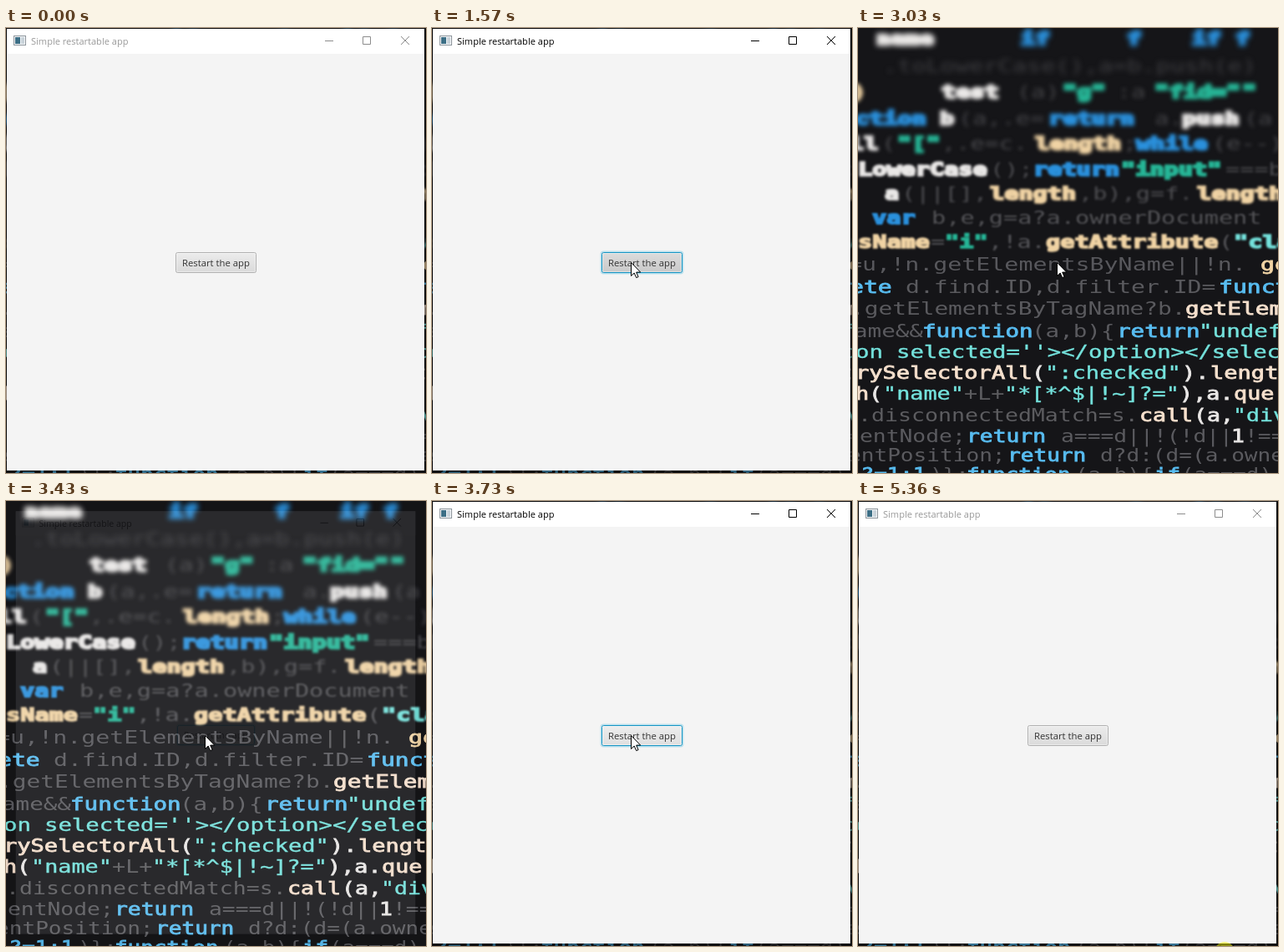
These frames come from a looping animation (503x534 px, 5820 ms). An HTML page:

```html
<!DOCTYPE html>
<html lang="en">
<head>
<meta charset="utf-8">
<title>Simple restartable app</title>
<style>
html, body { margin: 0; width: 100%; height: 100%; overflow: hidden; background: #151518; }
svg { display: block; width: 100%; height: 100%; }
text { white-space: pre; }
.ui { font-family: "Open Sans", "Noto Sans", sans-serif; }
#code { font: 21px "DejaVu Sans Mono", monospace; }
</style>
</head>
<body>
<svg viewBox="0 0 503 534">
  <defs>
    <linearGradient id="face" x1="0" y1="0" x2="0" y2="1">
      <stop id="faceTop"/><stop id="faceEnd" offset="1"/>
    </linearGradient>
  </defs>
  <rect width="503" height="534" fill="#151518"/>
  <g id="code"></g>
  <g id="win">
    <rect id="shadow" x="-9" y="-9" width="520" height="550" fill="none" stroke="#000" stroke-width="20"/>
    <rect x="1" y="1" width="500" height="530" fill="#f4f4f4"/>
    <rect x="1" y="1" width="500" height="30" fill="#fff"/>
    <g id="icon">
      <rect x="9.5" y="9.5" width="14" height="11" fill="#f4f6f8" stroke="#8d959c"/>
      <rect x="11" y="11" width="6" height="8" fill="#3d6f86"/>
      <rect x="18" y="11" width="4" height="8" fill="#c9d3da"/>
    </g>
    <text id="title" class="ui" x="30" y="20" font-size="11.05">Simple restartable app</text>
    <path id="controls" fill="none" d="M382 15.5h10M427.5 10.5h9v9h-9zM473 10l10 10M483 10l-10 10"/>
    <rect id="glow" x="202.3" y="268.3" width="98.4" height="26.4" rx="3" fill="none" stroke="#039ed3" stroke-opacity=".25" stroke-width="1.4"/>
    <rect id="button" x="203.5" y="269.5" width="96" height="24" rx="2" fill="url(#face)"/>
    <rect id="shine" x="204.5" y="270.5" width="94" height="22" rx="1" fill="none" stroke="#fff" stroke-opacity=".4"/>
    <text class="ui" x="211" y="286" font-size="11.3" fill="#333">Restart the app</text>
  </g>
  <circle id="click" r="12" fill="#ff0" fill-opacity=".47"/>
  <path id="cursor" d="M.5.5v16l3.7-3.5 2.5 5.6 2.4-1-2.4-5.5h5z" fill="#fff" stroke="#000"/>
</svg>
<script>
const $ = id => document.getElementById(id);
const set = (id, attrs) => { for (const k in attrs) $(id).setAttribute(k, attrs[k]); };
const show = (id, on) => set(id, { visibility: on ? 'visible' : 'hidden' });

const INK = { w: '#e9e7e6', t: '#f0d3a4', b: '#2a90dc', l: '#58bcf0', g: '#26b596', c: '#74e2dc', p: '#f6e0cd', d: '#5f5f63' };

// One line of the wallpaper: baseline, blur, then [x, ink, text] pieces.
// Letters get narrower down the page; blurred bright ones swell.
function line(y, blur, ...parts) {
  const advance = Math.min(17.2, 18.73 - .0058 * y);
  const spans = parts.map(([x, ink, s]) => {
    const dim = ink === 'd';
    const weight = dim ? 0 : blur > .6 ? 1 + blur * .7 : ink === 'c' ? .4 : .8;
    const safe = s.replace(/&/g, '&amp;').replace(/</g, '&lt;');
    return `<text transform="translate(${x} ${y}) scale(${advance / 12.64} 1)" fill="${INK[ink]}"` +
      ` stroke="${INK[ink]}" stroke-width="${weight}" opacity="${dim ? 1 - blur * .15 : 1}"` +
      ` font-weight="${blur > .6 && !dim ? 700 : 400}">${safe}</text>`;
  });
  $('code').insertAdjacentHTML('beforeend', `<g style="filter:blur(${blur}px)">${spans.join('')}</g>`);
}

line(20, 3.2, [22, 'w', 'name'], [195, 'b', 'if'], [322, 'b', 'f'], [400, 'b', 'if'], [452, 'b', 'f']);
line(53, 3, [30, 'd', '.toLowerCase(),a=b.push(e)']);
line(84, 2.6, [-8, 't', ')'], [100, 'w', 'test'], [190, 'd', '(a)'], [245, 'g', '"g"'], [310, 'd', ':a'], [355, 'g', '"fid="'], [460, 'g', '"']);
line(116, 2.4, [-4, 'b', 'ction'], [98, 'w', 'b'], [120, 'd', '(a,.e='], [228, 'b', 'return'], [338, 'd', ' a.'], [388, 'w', 'push'], [462, 'd', '(a']);
line(146, 2.1, [-10, 'w', 'll'], [28, 'd', '('], [47, 'g', '"["'], [100, 'd', ',.e=c.'], [212, 't', 'length'], [317, 'd', ';'], [333, 'b', 'while'], [424, 'd', '(e--)']);
line(177, 1.8, [0, 'w', 'LowerCase'], [158, 'd', '();'], [210, 'b', 'return'], [315, 'g', '"input"'], [440, 'd', '===b']);
line(206, 1.5, [32, 'w', 'a'], [52, 'd', '(||[],'], [158, 't', 'length'], [264, 'd', ',b),g=f.'], [406, 't', 'length']);
line(235, 1.1, [17, 'b', 'var'], [88, 'd', 'b,e,g=a?a.ownerDocument']);
line(264, .8, [0, 't', 'sName'], [87, 'd', '='], [104, 'g', '"i"'], [156, 'd', ',!a.'], [225, 't', 'getAttribute'], [432, 'd', '('], [450, 'c', '"cla']);
line(291, .6, [-12, 'd', '=u,!n.getElementsByName||!n.'], [482, 't', 'ge']);
line(318, .4, [-10, 'l', 'ete'], [57, 'd', 'd.find.ID,d.filter.ID='], [432, 'l', 'funct']);
line(344, .4, [-9, 'd', '.getElementsByTagName?b.'], [392, 'p', 'getElem']);
line(371, .3, [-5, 'd', 'ame&&'], [77, 'l', 'function'], [208, 'd', '(a,b){'], [310, 'l', 'return'], [408, 'c', '"undef']);
line(396, .2, [-3, 'c', 'on'], [46, 'c', "selected=''></option></selec"]);
line(421, .2, [-3, 'p', 'rySelectorAll'], [208, 'w', '('], [224, 'c', '":checked"'], [388, 'w', ').'], [422, 'p', 'lengt']);
line(446, .2, [-3, 'p', 'h'], [13, 'w', '('], [30, 'c', '"name"'], [127, 'd', '+L+'], [175, 'c', '"*[*^$|!~]?="'], [385, 'w', '),a.'], [450, 'p', 'que']);
line(472, .2, [0, 'd', '.disconnectedMatch=s.'], [337, 'p', 'call'], [402, 'w', '(a,'], [449, 'c', '"div']);
line(497, .3, [2, 'd', 'entNode;'], [130, 'l', 'return'], [243, 'd', 'a===d||!(!d||'], [447, 'w', '1'], [463, 'd', '!==']);
line(520, .3, [-12, 'd', 'entPosition;'], [179, 'l', 'return'], [290, 'd', 'd?d:(d=(a.owner']);
line(543, .4, [-12, 'l', '}?=1:1'], [86, 'd', ')}:'], [130, 'l', 'function'], [260, 'd', '(a,b){'], [355, 'l', 'if'], [387, 'd', '(a===d)']);

const LOOP = 5820;
const ON_BUTTON = [238, 281], ENTRY = [425, 520], EXIT = [439, 541];
const mix = (a, b, p) => a.map((v, i) => Math.round(v + (b[i] - v) * p));
const smooth = p => p * p * (3 - 2 * p);

function cursorAt(t) {
  if (t < 150 || t >= 5060) return null;
  if (t < 290) return ENTRY;
  if (t < 850) return mix(ENTRY, ON_BUTTON, smooth((Math.floor((t - 290) / 80) + 1) / 8));
  if (t < 4590) return ON_BUTTON;
  const p = Math.floor((t - 4590) / 80) / 6;
  return mix([275, 302], EXIT, 1 - (1 - p) ** 1.6);
}

// [opacity, scale] of the closing and opening window
function windowAt(t) {
  if (t < 2880 || t >= 3730) return [1, 1];
  if (t < 2950) return [.7, .991];
  if (t < 3030) return [.25, .968];
  if (t < 3430) return [0, 1];
  if (t < 3500) return [.09, .957];
  if (t < 3580) return [.53, .982];
  if (t < 3660) return [.86, .995];
  return [.97, .999];
}

function draw(t) {
  const active = t >= 1400 && t < 5360;
  const pressed = t >= 1400 && t < 3030;
  const tip = cursorAt(t);
  const hover = tip && tip[0] > 203 && tip[0] < 300 && tip[1] > 269 && tip[1] < 294;
  const [alpha, scale] = windowAt(t);

  set('win', { opacity: alpha, transform: `translate(251 266) scale(${scale}) translate(-251 -266)` });
  set('shadow', { 'stroke-opacity': active ? .5 : .4 });
  set('title', { fill: active ? '#000' : '#999' });
  set('controls', { stroke: active ? '#000' : '#8c8c8c' });
  show('controls', !(t >= 2880 && t < 3030));

  const [top, end] = pressed ? ['#dcdcdc', '#c9c9c9'] : hover ? ['#ededed', '#dfdfdf'] : ['#ececec', '#dadada'];
  set('faceTop', { 'stop-color': top });
  set('faceEnd', { 'stop-color': end });
  set('button', { stroke: active ? '#1595c4' : '#b1b1b1' });
  show('glow', active);

  const clicked = t >= 1400 && t < 1570 ? [238, 280] : t >= 5360 ? EXIT : null;
  show('click', clicked);
  if (clicked) set('click', { cx: clicked[0], cy: clicked[1] });

  show('cursor', tip);
  if (tip) set('cursor', { transform: `translate(${tip})` });
}

const start = performance.now();
function tick() {
  draw((performance.now() - start) % LOOP);
  requestAnimationFrame(tick);
}
tick();
</script>
</body>
</html>
```
